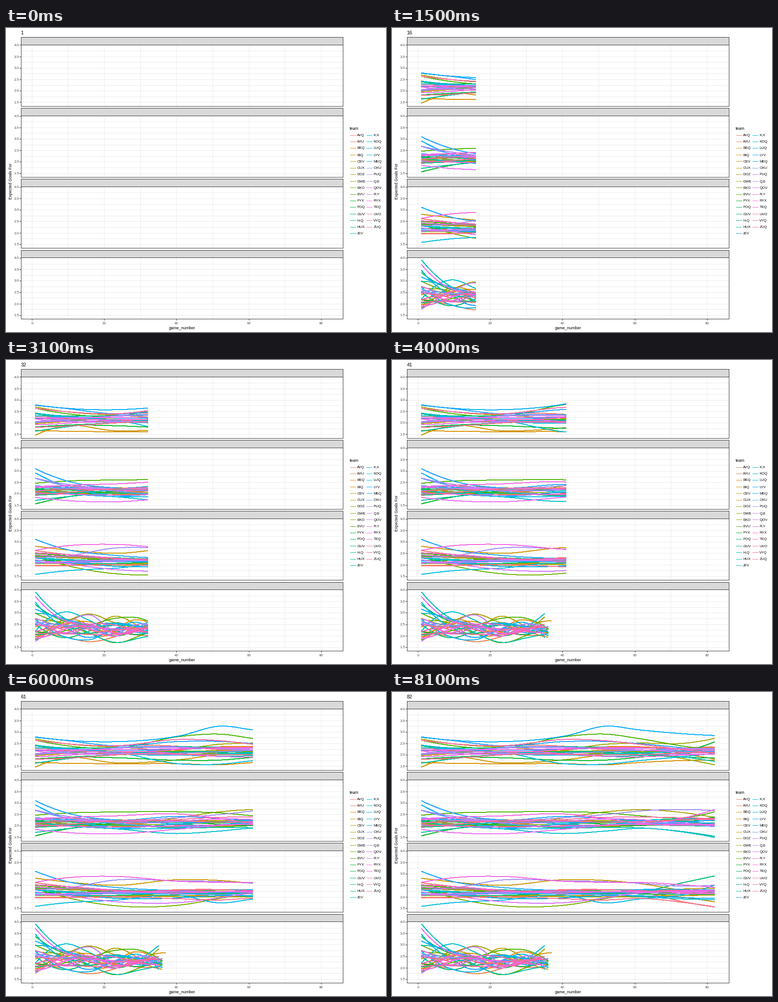
Recreate the animation shown at these times as a matplotlib script. Size 837 by 669 pixels, loop 8200 ms.

```python
import numpy as np
import matplotlib.pyplot as plt
from matplotlib.animation import FuncAnimation
from matplotlib.collections import LineCollection
from matplotlib.patches import Rectangle

W, H, DPI = 837, 669, 64
PX = 72 / DPI
GAMES = 82
LEFT, RIGHT = 33.5, 742.5
PERIOD = 156.25
DARK, GRID, STRIP = "#333333", "#EBEBEB", "#D9D9D9"
TEAMS = ("AVQ AXU BEQ BIQ CEV CUX DOZ DWE EKO EVU FYX FOQ GUV H.Q HUX JEV "
         "K.X KOQ LUQ LYV MEQ OXU PUQ Q.E QOV R.Y RYX TEQ UVO VYQ ZUQ").split()
LEGEND_ROWS = 16
EXPANSION_TEAM = 28

# Prominent curves: team index -> expected goals at the knots
FULL_KNOTS = (1, 9, 23, 41, 52, 61, 74, 82)
SHORT_KNOTS = (1, 9, 16, 23, 30, 36)

SEASON_1 = {
    19: (2.77, 2.63, 2.56, 2.82, 3.24, 3.08, 2.90, 2.83),
    20: (2.75, 2.62, 2.38, 2.57, 2.57, 2.48, 2.28, 2.15),
    9: (2.62, 2.40, 2.27, 2.79, 2.89, 2.70, 2.35, 2.20),
    29: (2.62, 2.48, 2.38, 2.66, 2.60, 2.45, 2.20, 2.05),
    4: (1.45, 1.85, 1.64, 1.78, 2.00, 2.10, 2.00, 1.80),
    3: (1.65, 1.62, 1.60, 1.60, 1.55, 1.65, 1.74, 1.75),
    17: (2.30, 2.25, 2.10, 1.59, 1.58, 1.73, 1.92, 2.05),
    6: (2.68, 2.48, 2.32, 2.24, 2.45, 2.50, 2.50, 2.70),
    10: (1.80, 1.88, 1.86, 1.75, 1.76, 1.88, 2.15, 2.55),
    7: (2.42, 2.15, 2.05, 2.12, 2.15, 2.10, 1.80, 1.55),
    14: (1.62, 1.80, 2.00, 2.12, 2.12, 2.08, 1.88, 1.70),
}
SEASON_2 = {
    20: (3.08, 2.58, 2.25, 2.40, 2.30, 2.22, 2.15, 2.10),
    19: (2.90, 2.32, 1.92, 2.08, 2.15, 2.10, 2.15, 2.25),
    22: (2.67, 2.42, 2.22, 2.35, 2.48, 2.63, 2.70, 2.65),
    21: (2.66, 2.35, 2.10, 1.95, 2.00, 2.12, 2.05, 1.95),
    9: (2.45, 2.54, 2.59, 2.60, 2.55, 2.43, 2.35, 2.60),
    10: (1.55, 1.83, 2.10, 2.18, 2.05, 2.00, 2.15, 2.38),
    25: (1.83, 1.70, 1.64, 1.85, 2.00, 2.05, 2.05, 2.00),
    16: (2.15, 2.02, 1.86, 1.65, 1.76, 1.88, 1.70, 1.48),
    14: (1.70, 1.85, 2.02, 1.88, 1.92, 1.90, 1.72, 1.53),
    6: (2.10, 2.00, 1.95, 2.35, 2.60, 2.69, 2.55, 2.35),
    26: (2.25, 2.35, 2.42, 2.50, 2.30, 2.10, 2.35, 2.70),
}
SEASON_3 = {
    20: (3.10, 2.68, 2.40, 2.25, 2.18, 2.30, 2.30, 2.20),
    4: (2.80, 2.65, 2.49, 2.74, 2.70, 2.57, 2.25, 2.10),
    26: (2.62, 2.81, 2.88, 2.66, 2.62, 2.62, 2.50, 2.40),
    22: (2.30, 2.36, 2.72, 2.68, 2.65, 2.58, 2.45, 2.50),
    8: (2.35, 1.98, 1.60, 1.63, 1.92, 2.15, 2.20, 2.12),
    17: (1.57, 1.72, 1.84, 2.05, 1.72, 1.89, 2.10, 2.50),
    24: (2.20, 2.05, 1.78, 1.74, 1.95, 2.15, 2.20, 2.15),
    12: (2.10, 2.05, 2.05, 2.15, 2.15, 2.20, 2.63, 2.90),
    30: (1.95, 1.95, 2.00, 1.90, 1.85, 1.92, 1.73, 1.55),
    0: (2.60, 2.45, 2.20, 2.30, 2.30, 2.20, 1.75, 1.54),
    3: (2.40, 2.10, 1.95, 2.10, 2.20, 2.15, 1.95, 1.77),
}
SEASON_4 = {
    15: (3.90, 2.75, 2.40, 2.45, 2.20, 2.40),
    25: (3.70, 2.65, 2.50, 2.10, 2.30, 2.50),
    17: (3.45, 2.40, 2.35, 2.50, 2.35, 2.00),
    11: (3.35, 2.62, 2.45, 2.20, 2.05, 2.30),
    19: (3.15, 2.72, 2.50, 2.55, 2.40, 2.20),
    14: (2.97, 2.72, 2.10, 1.70, 1.90, 2.10),
    16: (2.20, 3.03, 2.65, 2.10, 2.40, 3.10),
    6: (2.15, 2.60, 2.94, 2.55, 2.30, 2.98),
    23: (1.75, 2.50, 2.90, 2.20, 2.50, 2.20),
    1: (2.20, 1.95, 1.73, 1.95, 2.40, 2.30),
    18: (2.70, 1.95, 1.82, 2.30, 2.55, 1.72),
    5: (2.75, 2.40, 2.30, 2.85, 2.40, 2.10),
    9: (1.82, 2.20, 2.45, 2.75, 2.75, 2.30),
    8: (2.97, 2.45, 2.10, 1.68, 2.00, 2.40),
    12: (2.50, 1.90, 2.20, 2.45, 2.35, 2.15),
}
SEASONS = {"2014_2015": SEASON_1, "2015_2016": SEASON_2,
           "2016_2017": SEASON_3, "2017_2018": SEASON_4}

rng = np.random.default_rng(14)


def hue_color(i, n=len(TEAMS), lum=65, chroma=100):
    """Evenly spaced hue in polar CIE-LUV, converted to sRGB."""
    h = np.radians(15 + 360 * i / n)
    u = chroma * np.cos(h) / (13 * lum) + 0.1978
    v = chroma * np.sin(h) / (13 * lum) + 0.4683
    y = ((lum + 16) / 116) ** 3
    x = 9 * y * u / (4 * v)
    z = -x / 3 - 5 * y + 3 * y / v
    rgb = np.array([[3.2405, -1.5371, -0.4985],
                    [-0.9693, 1.8760, 0.0416],
                    [0.0556, -0.2040, 1.0572]]) @ (x, y, z)
    rgb = np.clip(rgb, 0, 1)
    return tuple(np.where(rgb > 0.00304, 1.055 * rgb ** (1 / 2.4) - 0.055, 12.92 * rgb))


def smooth_curve(knots, values, x):
    """Cubic Hermite interpolation through the knots."""
    k, v = np.array(knots, float), np.array(values)
    m = np.gradient(v, k, edge_order=2)
    i = np.clip(np.searchsorted(k, x, side="right") - 1, 0, len(k) - 2)
    h = k[i + 1] - k[i]
    t = (x - k[i]) / h
    return ((1 + 2 * t) * (1 - t) ** 2 * v[i] + t * (1 - t) ** 2 * h * m[i]
            + t * t * (3 - 2 * t) * v[i + 1] + t * t * (t - 1) * h * m[i + 1])


def random_curve(x, short):
    """Gentle wave around the league average, with a spread-out start."""
    s = (x - 1) / (36 if short else 81)
    amps = (.09, .13, .14, .13, .10) if short else (.05, .07, .05)
    spread, decay, limit = (.5, 4, .55) if short else (.22, 9, .45)
    d = rng.uniform(-.17, .17)
    d = d + sum(a * rng.normal() * np.cos(np.pi * (k + 1) * s) for k, a in enumerate(amps))
    d = d + rng.uniform(-spread, spread) * np.exp(-(x - 1) / decay)
    return (2.28 if short else 2.14) + limit * np.tanh(d / limit)


def px_x(game):
    return 57 + 7.97 * np.asarray(game)


def px_y(goals, panel):
    return 36.8 + 50.4 * (4 - np.asarray(goals)) + PERIOD * panel


def crisp(v):
    return np.floor(v) + 0.5


def line(x, y, color, z):
    ax.plot(x, y, color=color, lw=PX, antialiased=False, zorder=z,
            solid_capstyle="butt")


def label(x, y, text, px=8, color="black", **kw):
    return ax.text(x, y, text, fontsize=px * PX, color=color, va="baseline", **kw)


def box(top, bottom, face, z):
    ax.add_patch(Rectangle((LEFT, top), RIGHT - LEFT, bottom - top, facecolor=face,
                           edgecolor=DARK, lw=PX, antialiased=False, zorder=z))


plt.rcParams["font.family"] = "Liberation Sans"
fig = plt.figure(figsize=(W / DPI, H / DPI), dpi=DPI, facecolor="white")
ax = fig.add_axes([0, 0, 1, 1])
ax.set(xlim=(0, W), ylim=(H, 0))
ax.axis("off")

colors = [hue_color(i) for i in range(len(TEAMS))]
curves, curve_colors = [], []

for p, (season, featured) in enumerate(SEASONS.items()):
    short = p == 3
    top = crisp(36 + PERIOD * p)
    bottom = crisp(171 + PERIOD * p)
    for goals in np.arange(1.5, 4, 0.25):
        y = crisp(px_y(goals, p))
        line((LEFT, RIGHT), (y, y), GRID, 1)
    for game in range(0, 90, 10):
        x = crisp(px_x(game))
        line((x, x), (top, bottom), GRID, 1)
    box(top, bottom, "none", 4)
    box(crisp(19.4 + PERIOD * p), top, STRIP, 5)
    label(387.5, top - 5.5, season, color="#1A1A1A", ha="center")
    for goals in np.arange(1.5, 4.1, 0.5):
        y = crisp(px_y(goals, p))
        line((30.5, LEFT), (y, y), DARK, 4)
        label(28.5, y + 3, f"{goals:.1f}", color="#4D4D4D", ha="right")

    for i in range(len(TEAMS)):
        if i == EXPANSION_TEAM and not short:
            continue
        last = rng.choice([34, 35, 35, 36, 36, 37]) if short else GAMES
        games = np.arange(1, last + 1)
        if i in featured:
            if short:
                games = games[:36]
            goals = smooth_curve(SHORT_KNOTS if short else FULL_KNOTS, featured[i], games)
        else:
            goals = random_curve(games, short)
        curves.append(np.column_stack([px_x(games), px_y(goals, p)]))
        curve_colors.append(colors[i])

for game in range(0, 81, 20):
    x = crisp(px_x(game))
    line((x, x), (640, 643), DARK, 4)
    label(x, 651.5, str(game), color="#4D4D4D", ha="center")

label(387.5, 663, "game_number", 9, ha="center")
label(13, 337.5, "Expected Goals For", 9, ha="center", rotation=90, rotation_mode="anchor")
label(756.5, 224, "team", 9)
for i, team in enumerate(TEAMS):
    side, row = divmod(i, LEGEND_ROWS)
    x, y = 758 + 36 * side, crisp(235 + 14.45 * row)
    line((x, x + 12), (y, y), colors[i], 3)
    label(x + 15.3, y + 3, team)

counter = label(32.5, 14, "1", 11)
trails = LineCollection([], colors=curve_colors, linewidths=PX, antialiaseds=False, zorder=3)
ax.add_collection(trails, autolim=False)


def update(frame):
    game = frame + 1
    counter.set_text(str(game))
    trails.set_segments([c[:game] for c in curves])
    return counter, trails


anim = FuncAnimation(fig, update, frames=GAMES, interval=100,
                     init_func=lambda: update(0), repeat=True, repeat_delay=0)
plt.show()
```
